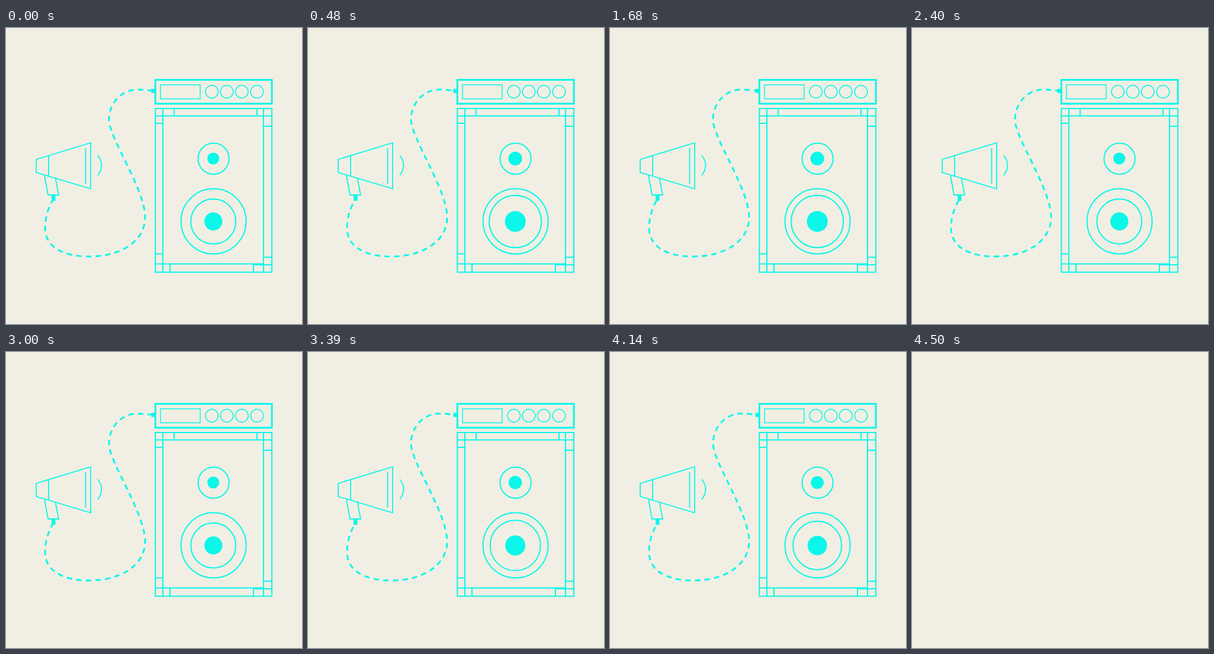
Animation of 500x500 px, one loop 4.53 s. Source, as an HTML page:

```html
<!DOCTYPE html>
<html lang="en">
<head>
<meta charset="utf-8">
<title>Megaphone and speaker</title>
<style>
  html, body { margin: 0; width: 100%; height: 100%; overflow: hidden; background: #f1efe3; }
  svg { display: block; width: 100%; height: 100%; }
  #art { fill: none; stroke: #0cf6ea; stroke-width: 2; }
  .solid { fill: #0cf6ea; stroke: none; }
  .thin { stroke-width: 1.5; }
  .bold { stroke-width: 3; }
</style>
</head>
<body>
<svg viewBox="0 0 500 500">
  <g id="art">
    <!-- megaphone -->
    <path d="M51 222L143 194V271.5L51 244ZM72 215.5V250M134.5 203V263M65 249L71 282H89L83.5 254" stroke-width="1.8"/>
    <path d="M155 215Q168 232 155 249" stroke-width="1.8"/>
    <path class="solid" d="M77 282H83.5V292H77ZM245.5 102.8H252V109.8H245.5Z"/>

    <!-- cable: one unit of path length is one dash and one gap -->
    <path id="cable" class="bold" pathLength="34.56" stroke-dasharray=".56 .44"
      d="M80 288C77 296 66 311 66 338C66 370 97 386 140 386C197 386 235 358 235 320C235 272 174 186 174 155C174 127 195 104 222 104C231 104 238 105 248 106"/>

    <!-- amplifier -->
    <rect class="bold" x="252.3" y="87.6" width="196.8" height="40.3"/>
    <rect class="thin" x="261" y="96" width="67" height="23.6"/>
    <g class="thin">
      <circle cx="347.7" cy="107.6" r="10.8"/>
      <circle cx="373" cy="107.6" r="10.8"/>
      <circle cx="398.3" cy="107.6" r="10.8"/>
      <circle cx="424" cy="107.6" r="10.8"/>
    </g>

    <!-- cabinet -->
    <rect x="252.3" y="136" width="196.8" height="276.5"/>
    <path d="M265 136V412.5M435 136V412.5M252 148.4H449M252 398.6H435
      M284 136V148.4M424 136V148.4M252 161H265M435 166H449
      M252 381.5H265M277 398.6V412.5M435 387.2H449M449 400H418V412.5"/>
    <circle cx="350.6" cy="220.7" r="26.2"/>
    <circle cx="350.6" cy="326.6" r="55"/>
    <circle id="tweeter" class="solid" cx="350.1" cy="220.5"/>
    <circle id="cone" cx="350.2" cy="326.8"/>
    <circle id="cap" class="solid" cx="350.2" cy="326.8"/>
  </g>
</svg>
<script>
  const LOOP = 4530, STEP = 30, BLANK_AT = 4500, BEAT = 300, DASH_CYCLE = 750;
  const byId = id => document.getElementById(id);
  const [art, cable, tweeter, cone, cap] = ['art', 'cable', 'tweeter', 'cone', 'cap'].map(byId);
  const start = performance.now();

  function draw() {
    const t = Math.floor((performance.now() - start) % LOOP / STEP) * STEP;
    const pulse = 1 - Math.abs(t % BEAT / BEAT * 2 - 1);
    const strongBeat = Math.floor(t / BEAT) % 2 === 1;
    const coneRadius = 38 + pulse * (strongBeat ? 7.6 : 2.5);

    art.style.visibility = t >= BLANK_AT ? 'hidden' : 'visible';
    cable.setAttribute('stroke-dashoffset', -(t / DASH_CYCLE % 1));
    tweeter.setAttribute('r', 10.1 + pulse * 1.9);
    cone.setAttribute('r', coneRadius);
    cap.setAttribute('r', coneRadius * 0.4);
    requestAnimationFrame(draw);
  }
  draw();
</script>
</body>
</html>
```
